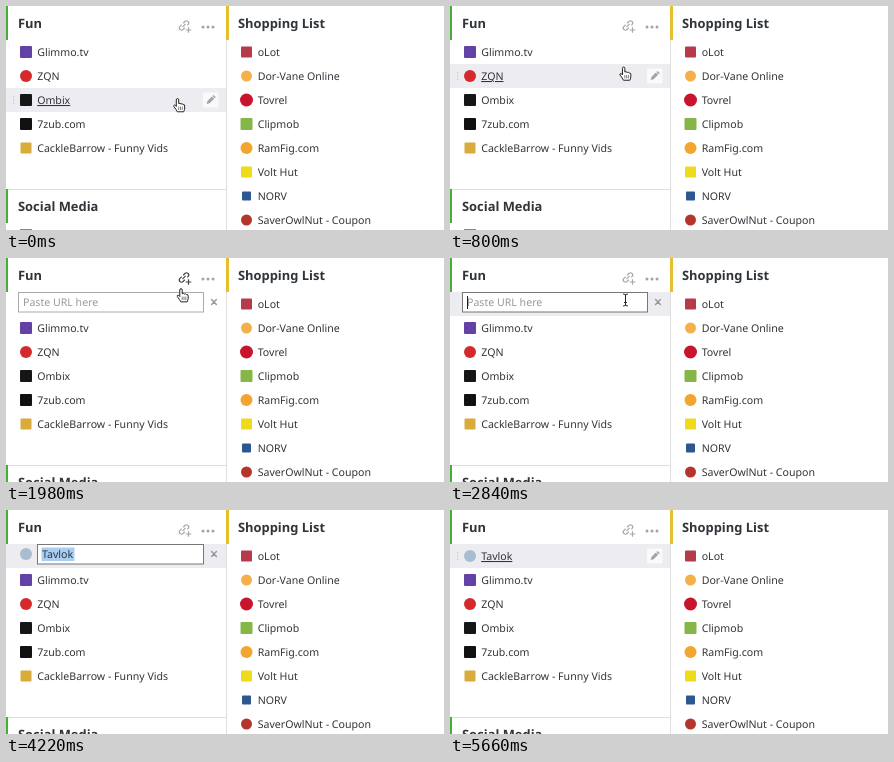
These frames come from a looping animation (438 px wide and 224 px high, 5.74 s). An HTML page:

```html
<!DOCTYPE html>
<html lang="en">
<head>
<meta charset="utf-8">
<title>Adding a link</title>
<style>
  html, body { margin: 0; width: 100%; height: 100%; overflow: hidden; background: #fff; }
  svg { display: block; width: 438px; height: 224px; }
  text { font: 10.6px "Noto Sans", "Open Sans", sans-serif; fill: #30353a; text-rendering: geometricPrecision; }
  .head { font-size: 12.9px; font-weight: 600; }
  .hint { fill: #999; }
  .on text { text-decoration: underline; }
  .tools, .back { visibility: hidden; }
  .on .tools, .on .back { visibility: visible; }
</style>
</head>
<body>
<svg id="stage" viewBox="0 0 438 224"></svg>
<script>
const LOOP = 5740, ROW = 24, TOP = 46;
const GREEN = '#45ae34', YELLOW = '#e6be2e', LINE = '#dedede', HOVER = '#ececf1';
const stage = document.getElementById('stage');

function add(parent, tag, attrs = {}, content) {
  const node = document.createElementNS('http://www.w3.org/2000/svg', tag);
  for (const key in attrs) node.setAttribute(key, attrs[key]);
  if (content) node.textContent = content;
  parent.appendChild(node);
  return node;
}
const group = (parent, cls) => add(parent, 'g', cls ? { class: cls } : {});
const rect = (p, x, y, width, height, fill, more) => add(p, 'rect', { x, y, width, height, fill, ...more });
const dot = (p, cx, cy, r, fill) => add(p, 'circle', { cx, cy, r, fill });
const label = (p, x, y, content, cls = '') => add(p, 'text', { x, y, class: cls }, content);
const stroke = (p, d, color, width = 1) =>
  add(p, 'path', { d, fill: 'none', stroke: color, 'stroke-width': width, 'stroke-linecap': 'round' });
const move = (node, x, y) => node.setAttribute('transform', `translate(${x} ${y})`);
const show = (node, on) => node.setAttribute('display', on ? 'inline' : 'none');

function icon(parent, x, round, color, size = 12) {
  return round ? dot(parent, x, 0, size / 2, color)
    : rect(parent, x - size / 2, -size / 2, size, size, color, { rx: 1 });
}

// Row with its centre line at y = 0
function row(parent, x, [name, round, color, size]) {
  const g = group(parent);
  rect(g, 0, -12, 220, ROW, HOVER, { class: 'back' });
  icon(g, x + 20, round, color, size);
  label(g, x + 31.2, 4, name);
  const tools = group(g, 'tools');
  for (const y of [-3, 0, 3]) dot(tools, 7.7, y, 0.6, '#aaa');
  rect(tools, 197, -7.5, 15.5, 15, '#fafafa', { rx: 1 });
  add(tools, 'path', {
    d: 'M-1.6 -5.6H1.6V-4H-1.6ZM-1.6 -3.2H1.6V3L0 5.8L-1.6 3Z',
    fill: '#a4a4a6', transform: 'translate(204.7 0) rotate(45)'
  });
  return g;
}

const funItems = [
  ['Glimmo.tv', 0, '#6441a5'],
  ['ZQN', 1, '#d42a2c'],
  ['Ombix', 0, '#161616'],
  ['7zub.com', 0, '#111'],
  ['CackleBarrow - Funny Vids', 0, '#d9ab3a', 11]
];
const shopItems = [
  ['oLot', 0, '#b43a4c', 11],
  ['Dor-Vane Online', 1, '#f4b04a', 11],
  ['Tovrel', 1, '#c8142d', 13],
  ['Clipmob', 0, '#86b548'],
  ['RamFig.com', 1, '#f2a530'],
  ['Volt Hut', 0, '#f0da1c', 11],
  ['NORV', 0, '#2d5790', 9],
  ['SaverOwlNut - Coupon', 1, '#b5352c', 11]
];

rect(stage, 0, 0, 438, 224, '#fff');
rect(stage, 220, 0, 1, 224, LINE);

// Shopping column
rect(stage, 220, 0, 3, 34, YELLOW);
label(stage, 232, 21.5, 'Shopping List', 'head');
shopItems.forEach((item, i) => move(row(stage, 220.5, item), 0, TOP + i * ROW));

// Fun column
const rows = funItems.map(item => row(stage, 0, item));
const added = row(stage, 0, ['Tavlok', 1, '#a9bdd0']);
added.setAttribute('class', 'on');
move(added, 0, TOP);
rect(stage, 0, 0, 2, 34, GREEN);
label(stage, 12, 21.5, 'Fun', 'head');
for (const x of [197, 202, 207]) dot(stage, x, 21, 1.5, '#a3a3a3');
const link = add(stage, 'g', { fill: 'none', 'stroke-width': 1.2 });
add(link, 'path', {
  d: 'M-1 2.2H-3.5A2.2 2.2 0 0 1 -3.5 -2.2H-1M1 -2.2H3.5A2.2 2.2 0 0 1 3.5 2.2H2.5M-2.2 0H2.2',
  transform: 'translate(178 19.5) rotate(-45)'
});
add(link, 'path', { d: 'M182.5 21.2V26.8M179.7 24H185.3' });

// Social block
const social = group(stage);
rect(social, 0, 183, 220, 1, LINE);
rect(social, 0, 183, 2, 34, GREEN);
label(social, 12, 204.8, 'Social Media', 'head');
rect(social, 14, 223, 12, 12, '#7d8a86');

// Entry form
const form = group(stage);
const formBack = rect(form, 0, 34, 220, ROW, HOVER);
stroke(form, 'M205.6 41.6L210.4 46.4M210.4 41.6L205.6 46.4', '#96969c', 1.4);
const field = (p, x) => rect(p, x + 0.5, 34.5, 197 - x, 19.5, '#fff', { stroke: '#777' });
const urlPart = group(form);
const urlField = field(urlPart, 12);
label(urlPart, 17, 48, 'Paste URL here', 'hint');
const caret = rect(urlPart, 17, 38, 1, 13, '#222');
const namePart = group(form);
field(namePart, 31);
rect(namePart, 35.5, 37.5, 33, 13.5, '#a9cef4');
label(namePart, 36, 48, 'Tavlok');
const favicon = group(form);
icon(favicon, 20, 1, '#a9bdd0');
move(favicon, 0, 44);

// Pointers
const hand = group(stage);
add(hand, 'path', {
  d: 'M-1.2 7.5V.9Q-1.2 -.4 0 -.4T1.2 .9V4.6Q2.6 3.8 3.5 5Q4.8 4.4 5.6 5.6Q7.2 5.2 7.2 7V9Q7.2 10.6 6.2 12.8H-.2Q-1 11 -3.6 7.6Q-4.2 6.4 -3 6Q-2.2 6 -1.2 7.5Z',
  fill: '#fff', stroke: '#222', 'stroke-linejoin': 'round'
});
stroke(hand, 'M1.2 8V10.6M3 8V10.6M4.8 8V10.6', '#444', 0.7);
const beam = group(stage);
stroke(beam, 'M-2 -6Q0 -6 0 -4.8Q0 -6 2 -6M0 -5V5M-2 6Q0 6 0 4.8Q0 6 2 6M-1 2.5H1', '#222');

// time, x, y of the pointer tip
const path = [
  [0, 171.5, 93], [440, 172.5, 86], [620, 173, 75], [900, 174, 54], [1140, 175, 38],
  [1400, 177, 25], [1780, 177, 24], [1980, 175, 31], [2220, 175.5, 42], [LOOP, 175.5, 42]
];
const OPEN = 1640, OPENED = 1860, OVER = 2060, NAMED = 3200, ICON = 3700, SAVED = 4480;

const clamp = v => Math.max(0, Math.min(1, v));
const ease = v => v * v * (3 - 2 * v);

function pointer(t) {
  const i = path.findIndex(p => p[0] > t);
  const [t0, x0, y0] = path[i - 1], [t1, x1, y1] = path[i];
  const k = (t - t0) / (t1 - t0);
  return [x0 + (x1 - x0) * k, y0 + (y1 - y0) * k];
}

function draw(t) {
  const [x, y] = pointer(t);
  const open = ease(clamp((t - OPEN) / (OPENED - OPEN)));
  const hovered = t < OPEN ? Math.floor((y - TOP + ROW / 2) / ROW) : -1;
  rows.forEach((r, i) => {
    move(r, 0, TOP + (i + open) * ROW);
    r.setAttribute('class', i === hovered ? 'on' : '');
  });
  move(social, 0, open * ROW);

  const saved = t >= SAVED, named = t >= NAMED, over = t >= OVER;
  show(added, saved);
  show(form, open > 0 && !saved);
  form.setAttribute('opacity', open);
  show(formBack, over);
  show(urlPart, !named);
  show(namePart, named);
  show(favicon, t >= ICON);
  urlField.setAttribute('stroke', over ? '#777' : '#aaa');
  show(caret, t >= 2400 && (t - 2400) % 1060 < 530);

  link.setAttribute('stroke', t > 1270 && !over ? '#444' : '#a8a8a8');
  move(hand, x, y);
  move(beam, x, y);
  const typing = t > OPENED && y >= 37;
  show(hand, !typing);
  show(beam, typing && !named);
}

const start = performance.now();
function tick() {
  draw((performance.now() - start) % LOOP);
  requestAnimationFrame(tick);
}
tick();
</script>
</body>
</html>
```
